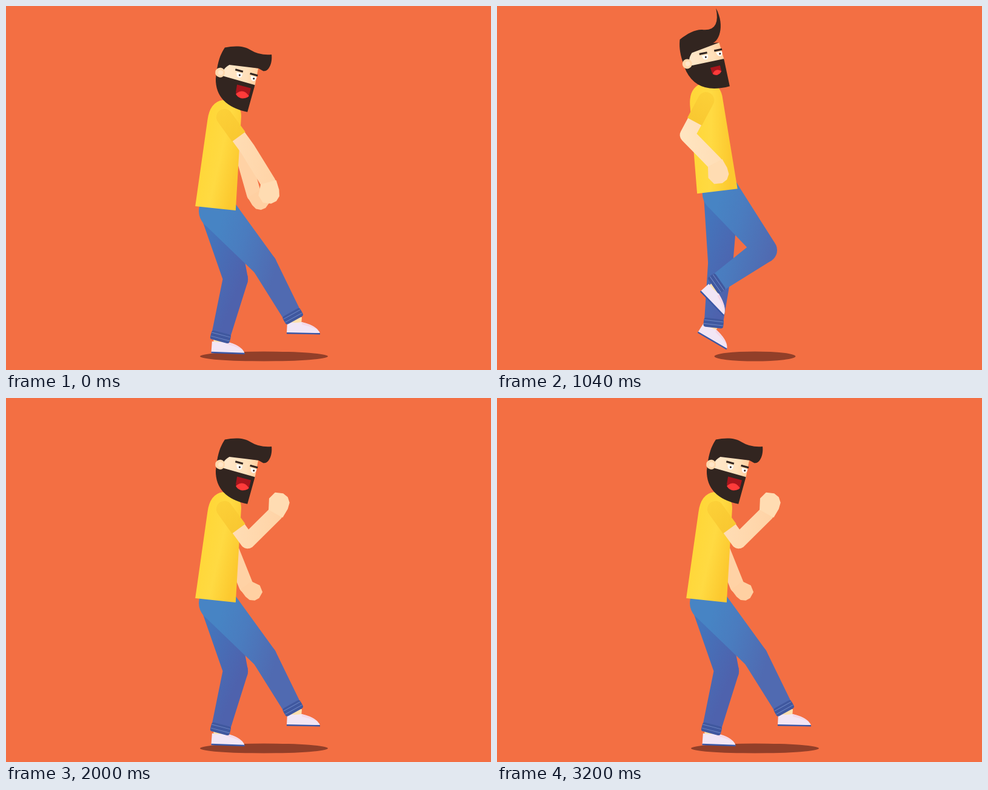
These frames come from a looping animation (800x600 px, 3240 ms). An HTML page:

```html
<!DOCTYPE html>
<html lang="en">
<head>
<meta charset="utf-8">
<title>Dancing man</title>
<style>
  html, body { margin: 0; width: 100%; height: 100%; overflow: hidden; background: #f36f43; }
  svg { display: block; width: 100vw; height: 100vh; }
</style>
</head>
<body>
<svg viewBox="0 0 800 600">
  <defs>
    <linearGradient id="shirt" gradientUnits="userSpaceOnUse" x1="322" y1="230" x2="386" y2="240">
      <stop offset="0" stop-color="#ffd738"/><stop offset=".5" stop-color="#ffda42"/><stop offset="1" stop-color="#fcc92f"/>
    </linearGradient>
    <linearGradient id="sleeve" gradientUnits="userSpaceOnUse" x1="-13" y1="0" x2="40" y2="0">
      <stop offset="0" stop-color="#fcd038"/><stop offset="1" stop-color="#f9c831"/>
    </linearGradient>
    <linearGradient id="skin" gradientUnits="userSpaceOnUse" x1="300" y1="0" x2="450" y2="0">
      <stop offset="0" stop-color="#ffe6c2"/><stop offset="1" stop-color="#ffd3a6"/>
    </linearGradient>
    <linearGradient id="face" gradientUnits="userSpaceOnUse" x1="345" y1="0" x2="400" y2="0">
      <stop offset="0" stop-color="#ffe8ca"/><stop offset=".7" stop-color="#ffe0ba"/><stop offset="1" stop-color="#ffcf9f"/>
    </linearGradient>
    <linearGradient id="frontJean" gradientUnits="userSpaceOnUse" x1="350" y1="370" x2="455" y2="400">
      <stop offset="0" stop-color="#4784c4"/><stop offset=".4" stop-color="#4a7cbf"/><stop offset="1" stop-color="#506ab1"/>
    </linearGradient>
    <linearGradient id="backJean" gradientUnits="userSpaceOnUse" x1="325" y1="400" x2="398" y2="430">
      <stop offset="0" stop-color="#4475bc"/><stop offset="1" stop-color="#4e62ad"/>
    </linearGradient>
    <path id="fist" d="M-3 12L10 24L23 24L31 14L32 5L28-3L19-8L4-12Z" stroke-width="2" stroke-linejoin="round"/>
    <g id="cuff">
      <rect x="-16.500" y="-7" width="33" height="15" rx="4" fill="#40589f"/>
      <path d="M-16-3H16M-16 3H16" fill="none" stroke="#6f88c6"/>
    </g>
    <g id="shoe">
      <path d="M-10 0H12L11 14H-9Z" fill="#ffe0ad"/>
      <path d="M-13 26L-12 8Q0 10 12 8Q34 13 41 24L42 27Z" fill="#f2e6f5"/>
      <path d="M12 8Q32 14 39 21Q26 15 12 12Z" fill="#f4d7e6"/>
      <path d="M-13 26.3L42 27.3" stroke="#3a57a5" stroke-width="2.4"/>
    </g>
  </defs>
  <rect width="800" height="600" fill="#f36f43"/>
  <ellipse id="shadow" cx="425.5" cy="577.5" ry="8" fill="#923f29"/>
  <g id="farArm">
    <path id="farLimb" fill="none" stroke="#ffd2a5" stroke-width="24" stroke-linecap="round"/>
    <use id="farHand" href="#fist" fill="#ffd0a2" stroke="#ffd0a2"/>
  </g>
  <g id="backLeg"></g>
  <g id="frontLeg"></g>
  <g id="body">
    <path fill="url(#shirt)" d="M318 323L327.500 180Q329 150 350 145L378 155Q382 161 382.500 170L385 325Z"/>
    <g id="head">
      <path fill="url(#face)" d="M340 86H400L399 116L340 110Z"/>
      <path fill="#322520" d="M333 102L346 108L399 114L394 160Q340 157 333.500 114Z"/>
      <path id="hair" fill="#322520"/>
      <circle cx="339" cy="103" r="8" fill="#ffd9ae"/>
      <circle cx="340" cy="103" r="4" fill="#ffe6c8"/>
      <path d="M366 98L376 99Q376 106 371 106Q366 105 366 98ZM390 100L400 101Q399 108 395 108Q390 107 390 100Z" fill="#fff"/>
      <circle cx="371.500" cy="102" r="1.500" fill="#322520"/>
      <circle cx="395.500" cy="104" r="1.500" fill="#322520"/>
      <path d="M363 94L376 95.500M388 96.500L401 98" stroke="#322520" stroke-width="3.200"/>
      <g id="mouth">
        <path d="M371 119L392 121L391 133Q387 138 380 138Q372 136 371 130Z" fill="#a8151c"/>
        <path d="M371.500 133Q381 122 391 133Q387 138 380 138Q374 137 371.500 133Z" fill="#ff3b3a"/>
      </g>
    </g>
    <g id="arm">
      <path id="limb" fill="none" stroke="url(#skin)" stroke-width="25" stroke-linejoin="round" stroke-linecap="round"/>
      <use id="hand" href="#fist" fill="#ffdcb2" stroke="#ffdcb2"/>
      <path id="sleeveShape" fill="url(#sleeve)" d="M40 13.500H0A13 13 0 0 1 0-13.500H40Z"/>
    </g>
  </g>
</svg>
<script>
const STEP = 40, FRAMES = 81, BEAT = 10, RAD = Math.PI / 180;
const $ = id => document.getElementById(id);
const set = (id, name, value) => $(id).setAttribute(name, value);
const smooth = x => { x = Math.min(1, Math.max(0, x)); return x * x * (3 - 2 * x); };
const smoother = x => x * x * x * (x * (6 * x - 15) + 10);
const mix = (a, b, x) => a + (b - a) * x;
const polar = (p, deg, len) => [p[0] + len * Math.cos(deg * RAD), p[1] + len * Math.sin(deg * RAD)];
const angle = (a, b) => Math.atan2(b[1] - a[1], b[0] - a[0]) / RAD;
const line = pts => 'M' + pts.map(p => p.map(v => v.toFixed(2)).join(' ')).join('L');

// keys: [frame, value] pairs
function track(f, keys) {
  if (f <= keys[0][0]) return keys[0][1];
  for (let i = 1; i < keys.length; i++) {
    const [a, va] = keys[i - 1], [b, vb] = keys[i];
    if (f <= b) return mix(va, vb, smooth((f - a) / (b - a)));
  }
  return keys[keys.length - 1][1];
}

const LEGS = {
  back: { hipR: 29, thigh: 116, shin: 98, shoe: [-2, 0] },
  front: { hipR: 31, thigh: 118, shin: 96, shoe: [3, 2] }
};
const KNEE = 20.5;

for (const side in LEGS) {
  $(side + 'Leg').innerHTML =
    `<use id="${side}Shoe" href="#shoe"/>
     <g fill="url(#${side}Jean)"><circle id="${side}Hip" r="${LEGS[side].hipR}"/>
     <circle id="${side}Knee" r="${KNEE}"/><path id="${side}Jeans"/></g><use id="${side}Cuff" href="#cuff"/>`;
}

function drawLeg(side, hip, target, tilt) {
  const { hipR, thigh, shin, shoe } = LEGS[side];
  const aim = angle(hip, target);
  const dist = Math.min(Math.hypot(target[0] - hip[0], target[1] - hip[1]), thigh + shin - .3);
  const open = Math.acos((thigh ** 2 + dist ** 2 - shin ** 2) / (2 * thigh * dist)) / RAD;
  const up = aim - open, knee = polar(hip, up, thigh);
  const ankle = polar(hip, aim, dist), low = angle(knee, ankle);
  const mid = (up + low) / 2, inner = KNEE / Math.cos((low - up) / 2 * RAD);
  set(side + 'Jeans', 'd', line([
    polar(hip, up - 90, hipR), polar(knee, up - 90, KNEE), polar(knee, low - 90, KNEE),
    polar(ankle, low - 90, 15.5), polar(ankle, low + 90, 15.5),
    polar(knee, mid + 90, inner), polar(hip, up + 90, hipR)]) + 'Z');
  for (const [part, p] of [['Hip', hip], ['Knee', knee]]) {
    set(side + part, 'cx', p[0]);
    set(side + part, 'cy', p[1]);
  }
  set(side + 'Cuff', 'transform', `translate(${ankle}) rotate(${low - 90})`);
  set(side + 'Shoe', 'transform', `translate(${ankle}) rotate(${tilt}) translate(${shoe})`);
}

function drawArm(f) {
  const swing = [[0, 49.7], [3.3, 169], [10, 49.7]];
  const raising = f > 33.3;
  const upper = raising ? track(f, [[33.3, 169], [47.5, 49.7]]) : track(f % BEAT, swing);
  const fore = track(f, [[33.3, 54], [44.6, -49]]);
  const curl = track(f, [[33.3, 0], [42, -140], [46.5, 0]]);
  const shoulder = [355, 173], elbow = polar(shoulder, upper, 65), wrist = polar(elbow, fore, 65);
  set('limb', 'd', line([polar(shoulder, upper, 30), elbow, wrist]));
  set('hand', 'transform', `translate(${wrist}) rotate(${fore + curl}) scale(1 ${f > 38 ? -1 : 1})`);
  set('sleeveShape', 'transform', `translate(${shoulder}) rotate(${upper})`);
}

function drawFarArm(f, u) {
  const late = smooth((f - 35) / 4);
  const elbow = [mix(388 - 50 * u, 372, late), mix(228 + 35 * u, 239, late)];
  const wrist = [mix(413 - 79 * u, 400 - 28 * u, late), 296 + 17 * u];
  set('farLimb', 'd', line([elbow, wrist]));
  set('farHand', 'transform', `translate(${wrist}) rotate(${angle(elbow, wrist)}) scale(.85 -.85)`);
}

function draw(f) {
  // u: 0 in the crouch, 1 at the top of the beat
  const rise = 1 - Math.abs(f % BEAT - 5) / 5, u = smoother(rise);
  const pose = `translate(${345.5 + 19 * u} ${333.5 - 30 * u}) rotate(${4.3 - 13.5 * u}) translate(-351.5 -324)`;
  set('body', 'transform', pose);
  set('farArm', 'transform', pose);
  set('head', 'transform', `rotate(${15.8 * (.317 - u)} 372 140)`);
  set('mouth', 'transform', `translate(381 128) scale(${1.12 - .36 * u}) translate(-381 -128)`);
  set('shadow', 'rx', 105.5 - 43 * smooth(rise));

  const tip = [418 - 5.5 * u, 60 - 31 * u], low = 415 - 24 * u;
  set('hair', 'd', `M333 98C333 80 336 70 340 61C356 55 372 53 382 58
    Q${399 + 10 * u} ${65 + 4 * u} ${tip} C${422 - 3 * u} ${74 - 8 * u} ${low + 3} 89 ${low - 6} ${89 - 7 * u}
    Q400 86 400 86L352 88Q346 93 344 98L342 106L334 104Z`);

  const hip = [349 + 22 * u, 338 - 31 * u];
  drawLeg('back', hip, [354 + 3 * u, 545 - 16 * u], 1 + 30 * u);
  drawLeg('front', hip, [473 - 117 * u, 511 - 57 * u], 48 * u);
  drawFarArm(f, u);
  drawArm(f);
}

const start = performance.now();
function tick() {
  draw(Math.floor((performance.now() - start) / STEP) % FRAMES);
  requestAnimationFrame(tick);
}
tick();
</script>
</body>
</html>
```
